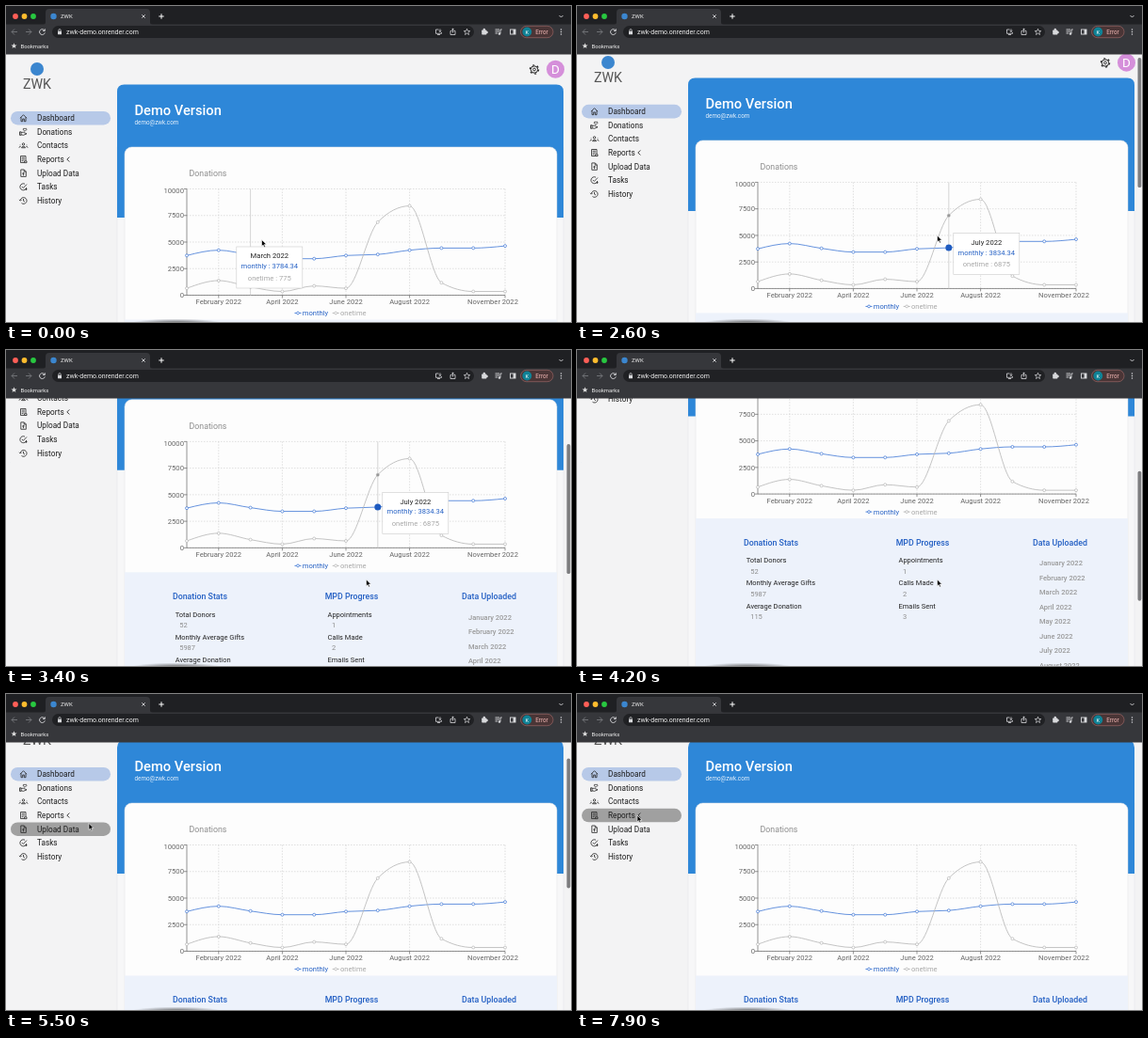
An HTML page for the animation above (8 s loop, 600x336 px).

```html
<!DOCTYPE html>
<html lang="en">
<head>
<meta charset="utf-8">
<title>Dashboard demo</title>
<style>
  html, body { margin: 0; width: 100%; height: 100%; overflow: hidden; background: #000; }
  svg { display: block; width: 600px; height: 336px; font-family: Roboto, Arial, sans-serif; }
</style>
</head>
<body>
<svg id="stage" viewBox="0 0 600 336" xmlns="http://www.w3.org/2000/svg"></svg>
<script>
const LOOP = 8000;
const BLUE = '#2460c4', GRAY = '#a8a8a8';
const MONTHS = ['January', 'February', 'March', 'April', 'May', 'June', 'July',
  'August', 'September', 'October', 'November'];
const MONTHLY = [3734.34, 4234.34, 3784.34, 3434.34, 3434.34, 3734.34, 3834.34,
  4234.34, 4434.34, 4434.34, 4634.34];
const ONETIME = [650, 1375, 775, 350, 875, 650, 6875, 8400, 1175, 350, 350];
const STEP = 33.8;
const chartX = i => 192 + STEP * i;
const chartY = v => 307.5 - v * 0.0113;

// Monotone cubic slopes, shared by the chart lines and the motion paths.
function slopes(p) {
  const d = p.slice(1).map((q, i) => (q[1] - p[i][1]) / (q[0] - p[i][0]));
  const m = p.map((q, i) => {
    const a = d[i - 1], b = d[i];
    if (a === undefined || b === undefined || a * b <= 0) return 0;
    const h0 = q[0] - p[i - 1][0], h1 = p[i + 1][0] - q[0];
    const mid = Math.abs((a * h1 + b * h0) / (h0 + h1)) / 2;
    return 2 * Math.sign(a) * Math.min(Math.abs(a), Math.abs(b), mid);
  });
  const n = p.length - 1;
  m[0] = (3 * d[0] - m[1]) / 2;
  m[n] = (3 * d[n - 1] - m[n - 1]) / 2;
  return m;
}

function curve(p) {
  const m = slopes(p);
  let path = `M${p[0]}`;
  for (let i = 1; i < p.length; i++) {
    const [x0, y0] = p[i - 1], [x1, y1] = p[i], h = (x1 - x0) / 3;
    path += `C${x0 + h},${y0 + h * m[i - 1]} ${x1 - h},${y1 - h * m[i]} ${x1},${y1}`;
  }
  return path;
}

function track(p) {
  const m = slopes(p), n = p.length - 1;
  return t => {
    if (t <= p[0][0]) return p[0][1];
    if (t >= p[n][0]) return p[n][1];
    const i = p.findIndex(q => q[0] > t) - 1;
    const h = p[i + 1][0] - p[i][0], u = (t - p[i][0]) / h, w = 1 - u;
    return w * w * ((1 + 2 * u) * p[i][1] + u * h * m[i])
         + u * u * ((3 - 2 * u) * p[i + 1][1] - w * h * m[i + 1]);
  };
}

// Markup helpers; text is placed by its vertical centre.
const text = (x, y, s, size, fill, more = '') =>
  `<text x="${x}" y="${y + size * 0.355}" font-size="${size}" fill="${fill}" ${more}>${s}</text>`;
const rect = (x, y, w, h, fill, more = '') =>
  `<rect x="${x}" y="${y}" width="${w}" height="${h}" fill="${fill}" ${more}/>`;
const circle = (x, y, r, fill, more = '') =>
  `<circle cx="${x}" cy="${y}" r="${r}" fill="${fill}" ${more}/>`;
const line = (d, stroke, width = 0.8, more = '') =>
  `<path d="${d}" fill="none" stroke="${stroke}" stroke-width="${width}" ${more}/>`;
const icon = (x, y, d, stroke, width = 0.9) => line(d, stroke, width, `transform="translate(${x} ${y})"`);
const MID = 'text-anchor="middle"', END = 'text-anchor="end"', MEDIUM = 'font-weight="500"';

const NAV = [
  ['Dashboard', 'M-3.5 0L0-3.5 3.5 0M-2.5-1V3.5H-.8V.8H.8V3.5H2.5V-1'],
  ['Donations', 'M-4 0V3.5H-2.5V0ZM-2.5 .5H0L3.5 2 0 3.5-2.5 3M1.5-.5L-.3-2.3C-.5-4 1.2-4 1.5-3 2-4 3.6-4 3.3-2.3Z'],
  ['Contacts', 'M-1.2-1.5A1.2 1.2 0 1 0 1.2-1.5 1.2 1.2 0 1 0-1.2-1.5M-2 2.3C-2 .5 2 .5 2 2.3ZM-4.5 2.3C-4.5 1-3.5.8-2.8 1M4.5 2.3C4.5 1 3.5.8 2.8 1M-3.5-.8V-.2M3.5-.8V-.2'],
  ['Reports', 'M-3-3.5H2.5V1.5M-3-3.5V3.5H1M-1.8-1.8H1.3M-1.8 0H1.3M-1.8 1.7H0M1 1.8H3.5V3.6H1Z'],
  ['Upload Data', 'M-2.7-3.7H.8L2.8-1.7V3.7H-2.7ZM.7-3.5V-1.5H2.7M0 2.7V-.4M-1.3.8L0-.5 1.3.8'],
  ['Tasks', 'M1.5-3.1A3.5 3.5 0 1 0 3.3.8M-1.7-.3L-.2 1.2 3.5-2.7M2 2.5H4M3 1.5V3.5'],
  ['History', 'M-3.2-.5A3.4 3.4 0 1 1-2 2.7M-4.5-1L-3.2.3-1.9-1M0-2V.3L1.5 1.2']
];
const navY = i => 119.2 + 14.62 * i;
const pill = (y, fill, id = '') => rect(5, y - 7.3, 106, 14.6, fill, `rx="7.3" ${id}`);

function sidebar() {
  const items = NAV.map(([label, d], i) =>
    icon(18.5, navY(i), d, '#222', 0.8) + text(33, navY(i), label, 8.2, '#1c1c1c', 'letter-spacing=".02"'));
  return circle(33, 67, 7, '#3b86cf')
    + text(33, 83, 'ZWK', 14.2, '#555', MID)
    + pill(navY(0), '#b7c9e8') + pill(0, '#a0a0a0', 'id="hover"')
    + items.join('') + icon(66, navY(3), 'M1.3-2.5L-1.2 0 1.3 2.5', '#222');
}

function series(values, color) {
  const points = values.map((v, i) => [chartX(i), chartY(v)]);
  return line(curve(points), color)
    + points.map(([x, y]) => circle(x, y, 1.5, '#fff', `stroke="${color}" stroke-width=".7"`)).join('');
}

function legend(x, label, color, fill) {
  return line(`M${x} 326.5h7`, color, 0.9) + circle(x + 3.5, 326.5, 1.4, '#fff', `stroke="${color}" stroke-width=".8"`)
    + text(x + 8.3, 326.5, label, 7.6, fill);
}

function chart() {
  let out = text(194.5, 178, 'Donations', 8.8, '#8d8d8d');
  const dash = 'stroke-dasharray="1.5 1.5"';
  for (let v = 0; v <= 10000; v += 2500) {
    const y = chartY(v);
    out += line(`M192 ${y}H530`, '#ccc', 0.6, dash) + line(`M189 ${y}h3`, '#666', 0.7)
      + text(189, v === 10000 ? y + 2.2 : y, v, 7.7, '#666', END);
  }
  for (const i of [1, 3, 5, 7, 10]) {
    const x = chartX(i);
    out += line(`M${x} 194.5V307.5`, '#ccc', 0.6, dash) + line(`M${x} 307.5v3`, '#666', 0.7)
      + text(i === 10 ? 517 : x, 314.6, MONTHS[i] + ' 2022', 7.6, '#666', MID);
  }
  return out + line('M192 194.5V307.5H530', '#666', 0.7)
    + '<path id="guide" d="M0 194.5V307.5" stroke="#ccc" stroke-width=".8"/>'
    + series(MONTHLY, '#3f78d6') + series(ONETIME, '#b5b5b5')
    + circle(0, 0, 3.5, '#1f5bc0', 'id="dotMonthly"') + circle(0, 0, 1.5, '#999', 'id="dotOnetime"')
    + legend(306.5, 'monthly', '#3f78d6', BLUE) + legend(346.7, 'onetime', '#b5b5b5', GRAY)
    + `<g id="tip">${rect(0, 0, 70, 44, '#fff', 'stroke="#ccc" stroke-width=".6"')}`
    + text(35, 9.6, '', 7.6, '#222', MID + ' id="tipMonth"')
    + text(35, 20.4, '', 7.6, BLUE, MID + ' id="tipMonthly"')
    + text(35, 33, '', 7.6, GRAY, MID + ' id="tipOnetime"') + '</g>';
}

function stats() {
  const column = (x, rows) => rows.map(([label, value], i) =>
    text(x, 378 + 24.2 * i, label, 7.5, '#222') + text(x + 4.5, 389.7 + 24.2 * i, value, 7.5, '#8d8d8d')).join('');
  const heading = (x, s) => text(x, 359, s, 8.8, BLUE, MID + ' ' + MEDIUM);
  return rect(126, 333.5, 459, 270, '#edf2fb')
    + heading(206, 'Donation Stats') + heading(367, 'MPD Progress') + heading(513, 'Data Uploaded')
    + column(179.7, [['Total Donors', 52], ['Monthly Average Gifts', 5987], ['Average Donation', 115]])
    + column(341.5, [['Appointments', 1], ['Calls Made', 2], ['Emails Sent', 3]])
    + MONTHS.slice(0, 8).map((m, i) => text(491, 381 + 15.5 * i, m + ' 2022', 7.5, '#999', MEDIUM)).join('');
}

function page() {
  return sidebar()
    + rect(118, 150, 474, 480, '#f7f7f8', 'stroke="#e8e8ea" stroke-width=".6"')
    + '<path d="M118 225V91q0-7.5 7.5-7.5H584.500q7.500 0 7.500 7.500V225Z" fill="#2e87d8"/>'
    + text(136.5, 111.2, 'Demo Version', 14.7, '#fff', MEDIUM)
    + text(136.5, 124, 'demo@zwk.com', 6.3, '#e4f0fb')
    + circle(561, 67.5, 3.7, 'none', 'stroke="#222" stroke-width="1"')
    + circle(561, 67.5, 4.7, 'none', 'stroke="#222" stroke-width="1.1" stroke-dasharray="2 2.92"')
    + circle(561, 67.5, 1.4, 'none', 'stroke="#222" stroke-width=".9"')
    + circle(583.5, 67.2, 9.5, '#d58fda') + text(583.5, 67.4, 'D', 13.5, '#fff', MID)
    + rect(126, 150, 459, 460, '#fdfdfd', 'rx="7.5" stroke="#e2e2e4" stroke-width=".5"')
    + stats() + chart();
}

function browser() {
  const ink = '#d8d9dc';
  const lights = ['#fe5f57', '#febc2e', '#28c840'].map((c, i) => circle(10 + 9.5 * i, 11, 2.9, c)).join('');
  const kebab = [-2.5, 0, 2.5].map(dy => circle(589.5, 27.5 + dy, 0.75, ink)).join('');
  return rect(0, 0, 600, 20, '#1f2023') + lights
    + '<path d="M39 20q3 0 3-3V7q0-4 4-4H149q4 0 4 4V17q0 3 3 3Z" fill="#36373b"/>'
    + rect(0, 19.5, 600, 32, '#36373b')
    + circle(50.5, 11, 3.2, '#3b86cf') + text(58, 11.2, 'ZWK', 6, '#eee')
    + icon(146, 11, 'M-1.7-1.7L1.7 1.7M1.7-1.7L-1.7 1.7', ink)
    + icon(165, 11, 'M-2.700 0H2.700M0-2.700V2.700', '#fff', 1)
    + icon(589.5, 11, 'M-2-1L0 1 2-1', ink)
    + icon(9, 27.5, 'M3 0H-3M0-3L-3 0 0 3', '#77787c') + icon(24, 27.5, 'M-3 0H3M0-3L3 0 0 3', '#77787c')
    + icon(38.5, 27.5, 'M2.500-1.300A2.900 2.900 0 1 0 2.800.800M2.800-3.200V-1H.600', ink)
    + rect(49, 21, 448, 13, '#202124', 'rx="6.5"')
    + rect(55, 26.8, 4, 3.4, ink, 'rx=".5"') + icon(57, 26.5, 'M-1.2.5V-.7A1.2 1.2 0 0 1 1.200-.700V.500', ink, 0.7)
    + text(64, 27.6, 'zwk-demo.onrender.com', 7, '#eee')
    + icon(459.5, 27.5, 'M0-2.500H-3V1.800H3V.500M-1.500 3H1.500M1.500-3V0M.200-1.200L1.500 0 2.800-1.200', ink, 0.8)
    + icon(474.5, 27.5, 'M-1-1H-2.500V3H2.500V-1H1M0 1V-3.500M-1.300-2.200L0-3.500 1.300-2.200', ink, 0.8)
    + icon(489.5, 27.5, 'M0-3.300L.900-1 3.300-.900 1.400.600 2 3 0 1.600-2 3-1.400.600-3.300-.900-.900-1Z', ink, 0.7)
    + rect(505.2, 25.5, 5.2, 5, ink, 'rx=".7"') + circle(507.8, 25, 1.2, ink) + circle(510.6, 28, 1.2, ink)
    + icon(523, 27.5, 'M-3.500-2.500H1M-3.500-.500H1M-3.500 1.500H-1M2 1.500V-2.500H3.700', ink, 0.9) + circle(521.1 + 2.900, 29.5, 1.3, ink)
    + rect(535.5, 25, 5.500, 5, 'none', `stroke="${ink}" stroke-width=".9"`) + rect(538.6, 25, 2.4, 5, ink)
    + rect(546.5, 21.3, 34.500, 12.4, '#4a3536', 'rx="6.2" stroke="#a86e6c" stroke-width=".6"')
    + circle(553.3, 27.5, 4.9, '#0f8296') + text(553.3, 27.6, 'K', 5.500, '#fff', MID)
    + text(569, 27.6, 'Error', 6.300, '#f2b8b5', MID) + kebab
    + '<path transform="translate(8.500 42.300)" d="M0-3L.800-.900 3-.800 1.300.600 1.900 2.800 0 1.500-1.900 2.800-1.300.600-3-.800-.800-.900Z" fill="#ddd"/>'
    + text(15.5, 42.5, 'Bookmarks', 5.900, '#f0f0f0');
}

const stage = document.getElementById('stage');
stage.innerHTML = `
  <defs>
    <clipPath id="view"><rect y="51" width="600" height="285"/></clipPath>
    <radialGradient id="shade"><stop offset=".3" stop-color="#555" stop-opacity=".65"/>
      <stop offset="1" stop-color="#555" stop-opacity="0"/></radialGradient>
  </defs>
  <g clip-path="url(#view)">${rect(0, 51, 600, 285, '#f3f3f4')}<g id="page">${page()}</g>
    ${rect(595.5, 0, 3.8, 138, '#7d7d7f', 'rx="1.9" id="thumb"')}</g>
  ${browser()}
  <ellipse cx="181" cy="337" rx="48" ry="4.5" fill="url(#shade)"/>
  <path id="cursor" d="M0 0V7L1.600 5.600 2.700 8 3.900 7.500 2.800 5.100H5Z" fill="#000" stroke="#fff" stroke-width=".6"/>`;

const el = id => document.getElementById(id);
const parts = Object.fromEntries(['page', 'thumb', 'hover', 'guide', 'dotMonthly', 'dotOnetime', 'tip',
  'tipMonth', 'tipMonthly', 'tipOnetime', 'cursor'].map(id => [id, el(id)]));

const scrollAt = track([[2480, 0], [2600, 7], [3000, 44], [3400, 97], [3900, 160], [4150, 158], [4500, 80], [4600, 56.5], [5000, 34]]);
const cursorX = track([[0, 271.5], [150, 276.3], [880, 310], [1100, 338.5], [1150, 344], [1950, 378], [2300, 382.5],
  [4850, 382.5], [5350, 92], [5500, 88], [6200, 66], [7900, 64]]);
const cursorY = track([[0, 248.5], [1100, 248.5], [2300, 244], [4850, 244], [5350, 142], [5500, 137.5], [6200, 130], [7900, 129]]);
const tipY = track([[0, 256], [350, 254], [1100, 253.5], [2200, 248.5]]);
const MONTH_CHANGES = [-93, 150, 880, 1150, 1950];
const glide = p => 1 - (1 - Math.min(1, Math.max(0, p))) ** 2;

const move = (node, x, y) => node.setAttribute('transform', `translate(${x} ${y})`);
const show = (node, on) => node.setAttribute('visibility', on ? 'visible' : 'hidden');

function render(t) {
  const scroll = scrollAt(t), x = cursorX(t), y = cursorY(t);
  move(parts.page, 0, -scroll);
  move(parts.cursor, x, y);
  parts.thumb.setAttribute('y', 51.5 + scroll / 2);
  parts.thumb.setAttribute('opacity', t < 2480 ? 0 : Math.min(1, Math.max(0, (6000 - t) / 200)));

  const row = Math.round((y + scroll - navY(0)) / 14.62);
  show(parts.hover, x < 111 && row > 0 && row < NAV.length);
  parts.hover.setAttribute('y', navY(row) - 7.3);

  const active = t < 3800;
  for (const id of ['guide', 'dotMonthly', 'dotOnetime', 'tip']) show(parts[id], active);
  if (!active) return;
  const month = 1 + MONTH_CHANGES.filter(c => t >= c).length;
  const shift = MONTH_CHANGES.reduce((sum, c) => sum + glide((t - c) / 400), 0);
  move(parts.guide, chartX(month), 0);
  move(parts.dotMonthly, chartX(month), chartY(MONTHLY[month]));
  move(parts.dotOnetime, chartX(month), chartY(ONETIME[month]));
  move(parts.tip, chartX(1 + shift) + 5, tipY(t));
  parts.tipMonth.textContent = `${MONTHS[month]} 2022`;
  parts.tipMonthly.textContent = `monthly : ${MONTHLY[month]}`;
  parts.tipOnetime.textContent = `onetime : ${ONETIME[month]}`;
}

const start = performance.now();
function frame(now) {
  render(Math.max(0, now - start) % LOOP);
  requestAnimationFrame(frame);
}
render(0);
requestAnimationFrame(frame);
</script>
</body>
</html>
```
